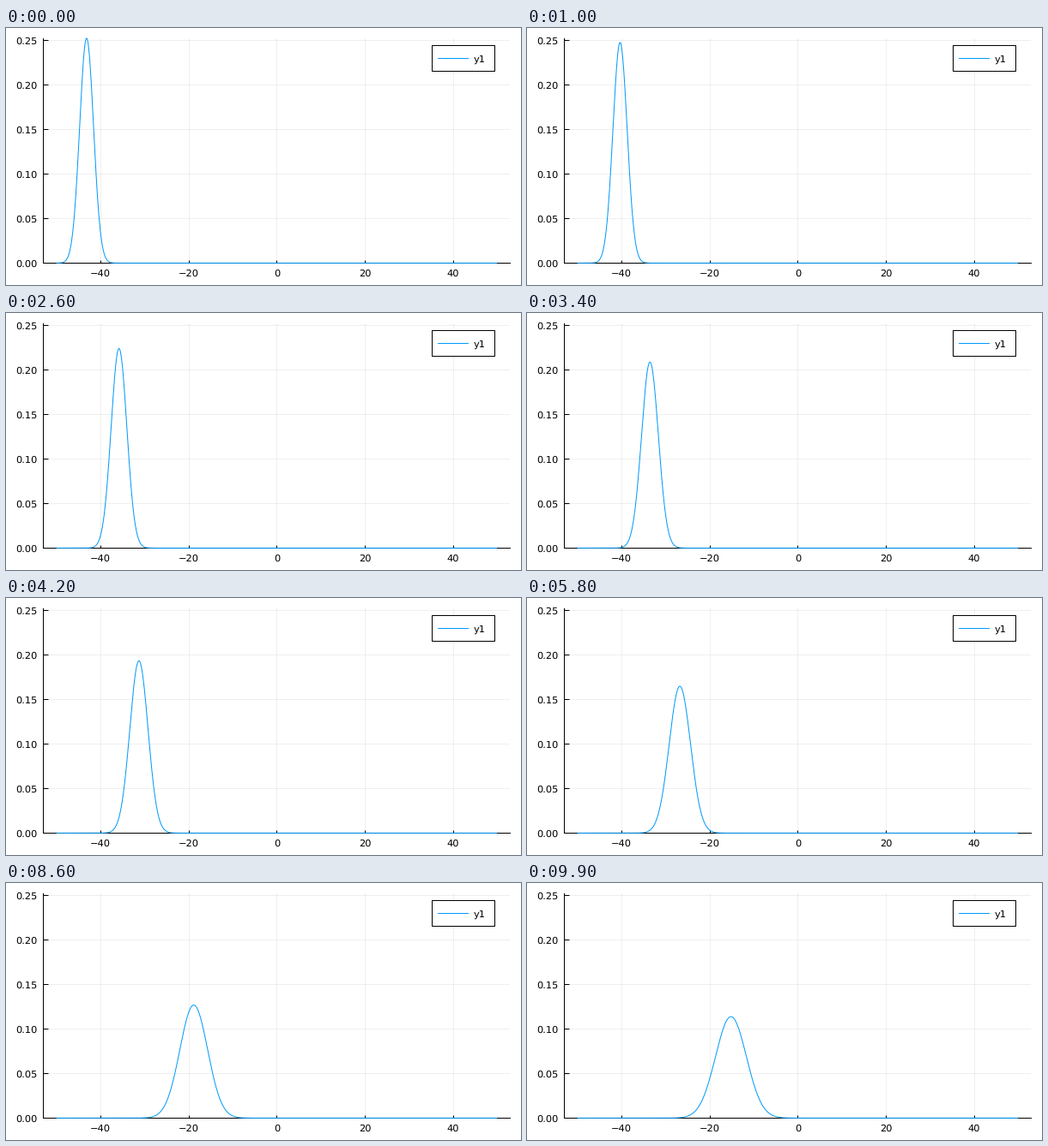
A matplotlib script that plays this animation: 600x300 px, repeating every 10000 ms.

```python
import numpy as np
import matplotlib.pyplot as plt
from matplotlib.animation import FuncAnimation
from matplotlib.lines import Line2D
from matplotlib.patches import Rectangle

W, H, DPI = 600, 300, 100
FRAMES, INTERVAL = 100, 100
LEFT, RIGHT, TOP, BOTTOM = 43.4, 587.4, 11.8, 274.4
BLUE = "#009afa"
PX = 72 / DPI  # points per pixel

START, SPEED, VAR0 = -43.16, 2 * np.sqrt(2), 2.5
PEAK = 1 / np.sqrt(2 * np.pi * VAR0)

plt.rcParams["font.family"] = "DejaVu Sans"
plt.rcParams["font.size"] = 11.4 * PX
plt.rcParams["text.hinting"] = "none"

fig = plt.figure(figsize=(W / DPI, H / DPI), dpi=DPI, facecolor="white")
ax = fig.add_axes([LEFT / W, 1 - BOTTOM / H,
                   (RIGHT - LEFT) / W, (BOTTOM - TOP) / H])
ax.set_xlim(-53, 53)
ax.set_ylim(0, PEAK)
ax.set_axisbelow(True)
ax.grid(color="black", alpha=0.1, linewidth=0.6 * PX)
for side in ("top", "right"):
    ax.spines[side].set_visible(False)
for side in ("left", "bottom"):
    ax.spines[side].set_linewidth(PX)

x_ticks = np.arange(-40, 41, 20)
y_ticks = np.linspace(0, 0.25, 6)
ax.set_xticks(x_ticks, [""] * len(x_ticks))
ax.set_yticks(y_ticks, [""] * len(y_ticks))
ax.tick_params(axis="x", direction="in", length=3 * PX, width=PX)
ax.tick_params(axis="y", direction="in", length=6 * PX, width=PX)


def label(x, y, text, ha):
    """Place text with its baseline at a pixel measured from the top left."""
    fig.text(x / W, 1 - y / H, text, ha=ha, va="baseline")


def to_pixel(x, y):
    px, py = ax.transData.transform((x, y))
    return px, H - py


for v in x_ticks:
    label(to_pixel(v, 0)[0], 290, f"{v}".replace("-", "\u2212"), "center")
for v in y_ticks:
    label(36.5, to_pixel(0, v)[1] + 4.2, f"{v:.2f}", "right")

# Legend
fig.add_artist(Rectangle((496 / W, 1 - 50 / H), 73 / W, 30 / H,
                         facecolor="white", edgecolor="black", linewidth=PX))
fig.add_artist(Line2D([503 / W, 539 / W], [1 - 35.5 / H] * 2,
                      color=BLUE, linewidth=PX, snap=False,
                      solid_capstyle="butt"))
label(545, 40, "y1", "left")

x = np.linspace(-50, 50, 1001)
curve, = ax.plot([], [], color=BLUE, linewidth=PX, clip_on=False,
                 solid_capstyle="butt", zorder=5)


def density(t):
    """Free Gaussian wave packet: drifts steadily while it spreads."""
    var = VAR0 + t**2 / (4 * VAR0)
    return np.exp(-(x - START - SPEED * t)**2 / (2 * var)) / np.sqrt(2 * np.pi * var)


def update(i):
    curve.set_data(x, density(i * 0.1))
    return curve,


anim = FuncAnimation(fig, update, frames=FRAMES, interval=INTERVAL,
                     repeat=True, repeat_delay=0)
plt.show()
```
